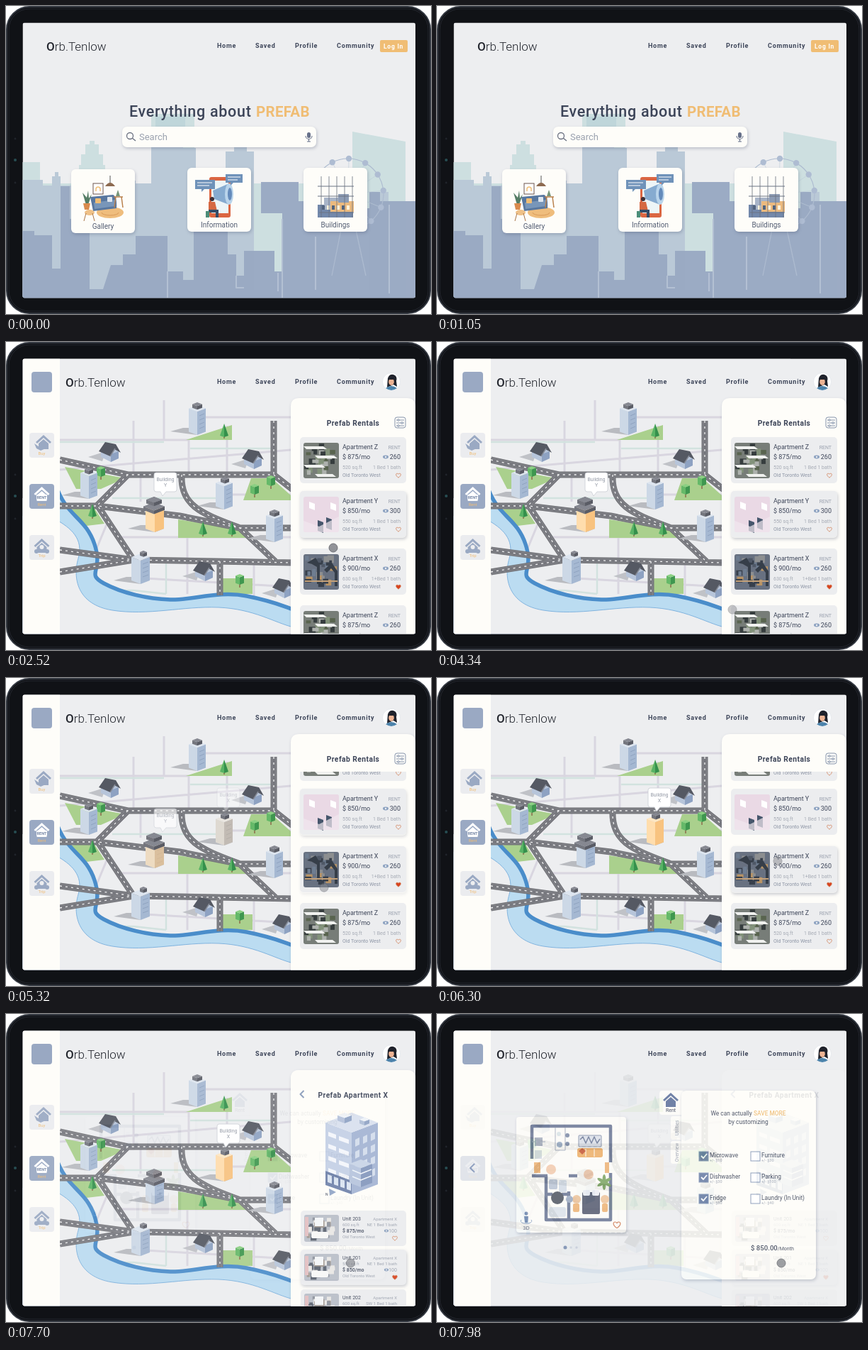
These frames come from a looping animation (600x434 px, 8 s). An HTML page:

```html
<!DOCTYPE html>
<html lang="en">
<head>
<meta charset="utf-8">
<title>Prefab rentals on a tablet</title>
<style>
html, body { margin: 0; height: 100%; overflow: hidden; background: #fff; }
svg { display: block; width: 100vw; height: 100vh; font-family: Roboto, Inter, sans-serif; }
.shadow { filter: drop-shadow(1px 2px 2px #3a456044); }
.nav { font-weight: 600; letter-spacing: .75px; }
.title { font-weight: 600; letter-spacing: .45px; }
</style>
</head>
<body>
<svg id="stage" viewBox="0 0 600 434"></svg>
<script>
const INK = '#3c4458', GREY = '#9aa1ae', BLUE = '#9aa9c3', ORANGE = '#f0bd74', PAPER = '#fefdf9', MIST = '#edeef0', BLACK = '#101216';

// Markup helpers
const rect = (x, y, w, h, fill, r = 0, more = '') =>
  `<rect x="${x}" y="${y}" width="${w}" height="${h}" rx="${r}" fill="${fill}" ${more}/>`;
const circle = (x, y, r, fill, more = '') => `<circle cx="${x}" cy="${y}" r="${r}" fill="${fill}" ${more}/>`;
const ellipse = (x, y, rx, ry, fill) => `<ellipse cx="${x}" cy="${y}" rx="${rx}" ry="${ry}" fill="${fill}"/>`;
const path = (d, fill, more = '') => `<path d="${d}" fill="${fill}" ${more}/>`;
const line = (d, stroke, w = 1, more = '') =>
  `<path d="${d}" fill="none" stroke="${stroke}" stroke-width="${w}" stroke-linejoin="round" ${more}/>`;
const text = (x, y, size, str, fill = INK, more = '') =>
  `<text x="${x}" y="${y}" font-size="${size}" fill="${fill}" ${more}>${str}</text>`;
const MID = 'text-anchor="middle"', END = 'text-anchor="end"';
const group = (id, ...parts) => `<g id="${id}">${parts.join('')}</g>`;
const at = (x, y, ...parts) => `<g transform="translate(${x} ${y})">${parts.join('')}</g>`;
const list = (n, make) => Array.from({ length: n }, (_, i) => make(i)).join('');
const random = seed => () => (seed = seed * 16807 % 2147483647) / 2147483647;

// Shared pieces
const heart = (x, y, full, s = 1) =>
  `<path transform="translate(${x} ${y}) scale(${s})" d="M0 3.2C-6-1-2.5-4.6 0-1.7 2.5-4.6 6-1 0 3.2Z" fill="${full ? '#d8421f' : 'none'}" stroke="#d07a50" stroke-width=".8"/>`;
const eye = (x, y, s = 1) => at(x, y, ellipse(0, 0, 4 * s, 2.4 * s, '#8ea3c1'), circle(0, 0, 1.2 * s, MIST));
const chevron = (x, y, s, color) => line(`M${x + s / 2} ${y - s}L${x - s / 2} ${y}L${x + s / 2} ${y + s}`, color, 2);
const brand = x => text(x, 63, 17, '<tspan font-weight="500">O</tspan>rb.Tenlow', '#23262e', 'font-weight="300"');
const nav = [['Home', 298], ['Saved', 352], ['Profile', 408], ['Community', 467]]
  .map(([label, x]) => text(x, 59, 9, label, INK, 'class="nav"')).join('');
const avatar = circle(544, 56, 12.5, '#fff', 'stroke="#dfe2e8" stroke-width=".7"') +
  path('M538 64L539 51Q541 45 547 46Q553 48 551 55L552 63L547 60Z', '#20232c') +
  ellipse(544, 56, 3.8, 5, '#eeb493') + path('M540 53Q542 48 548 51V53Z', '#20232c') + path('M536 65Q544 59 552 65Q544 71 536 65Z', '#4c83ab');
const screen = rect(23.5, 23.5, 554.5, 388, MIST);

// Home page
const ferris = line('M483 215a50 50 0 1 1-.1 0M483 265L460 380M483 265L508 380', '#aebcd0', 1.2) +
  list(13, i => {
    const a = i * Math.PI * 2 / 13 - 1.55, x = 483 + 50 * Math.cos(a), y = 265 + 50 * Math.sin(a);
    return line(`M483 265L${x} ${y}`, '#bccbd9', .6) + circle(x, y, 4.2, '#aebcd2');
  });
const skyline =
  path('M23 411V220H48V250H103V224H106V209H112V195H118V190H121V178V190H125V195H131V209H137V224H140V250H205V152H227V128V152H266V250H489V177L564 191V411Z', '#cddfe0') +
  path('M211 156H253V170H211Z', '#bfd6da') +
  path('M23 411V245H52V253H65V240H69V234H71V225V234H74V240H77V253H160V246H183V250H205V170H250V200H268V250H310V205H322V198H340V205H350V400H513V262H540V411Z', '#bac9d7') +
  path('M23 412V317H40V323H65V370H77V254H90V300H118V399H137L148 365H165V350H183V324H228V374H250V386H265V261H313V350H325V380H336V345H379V374H390V292H360V248H413V275H435V285H513V262H528V275H578V412Z', BLUE, 'opacity=".96"') +
  ferris +
  line('M228 374V411M325 380V397H336M384 376V402M390 300V411M437 325V400M541 280V405', '#b3c0d3', 2);

const sofaArt = ellipse(147, 291, 19, 8, '#efbd7d') + line('M135 291a12 4 0 0 0 24 0', '#d99a58') +
  rect(123, 250, 14, 15, '#fff', 0, 'stroke="#6c5650"') + line('M127 261v-3a3 3 0 0 1 6 0v3', ORANGE, 1.5) +
  line('M147 239V249', '#555') + path('M140 254Q147 244 154 254Z', '#8d6a50') +
  path('M119 269L151 266Q157 268 156 285L123 289Z', '#58779f') + path('M124 277L154 273V282L125 286Z', '#7896b9') +
  rect(126, 271, 8, 7, ORANGE, 1) + rect(143, 269, 7, 7, '#dee6ef', 1) +
  path('M113 280L108 263L114 270L116 260L117 271L121 265L116 280Z', '#547c65') + path('M109 278h10l-2 9h-6Z', '#d98a4d') +
  line('M152 269H165M155 269L153 284M163 269L165 284', '#b9804c', 1.5) + path('M155 268L158 259L161 268Z', '#77967a') +
  ellipse(118, 291, 7, 4, '#efc188') + line('M113 292L110 303M122 292L125 303', '#a97447');
const newsArt = rect(287, 241, 30, 57, '#db6642', 3) + rect(290, 246, 24, 46, '#edf5f7') +
  path('M292 260L315 250V280L294 272Z', '#86abd0') + ellipse(315, 265, 6, 15, '#b9d4eb') + ellipse(316, 265, 3, 9, '#648bbb') +
  path('M267 245H295V258H280L276 262V258H267Z', '#6f92b9') + line('M270 249H291M270 253H287', '#fff', 1.2) +
  path('M310 237H334V249H321L317 253V249H310Z', '#6f92b9') + line('M313 241H331M313 245H327', '#fff', 1.2) +
  circle(291, 272, 3, '#3d3038') + path('M286 276h9l3 13h-12Z', '#d66942') + path('M286 287H300V298H296V291H286Z', '#354c67') + rect(282, 289, 5, 9, '#4c8d78');
const siteArt = path('M440 280H490V298H440Z', '#7388aa') + rect(449, 270, 20, 17, '#a8b4c8') + rect(458, 275, 33, 15, '#ebba7f') +
  rect(469, 265, 15, 12, '#8d9cb4') + list(6, i => rect(446 + i * 7, 281, 4, 6, i % 2 ? '#fff4dd' : '#52647f')) +
  list(5, i => line(`M${445 + i * 11} 240V298`, '#68707f', .8)) + line('M440 254H491M440 268H491M442 291H491', '#6d7583', 1.2);
const homeCard = (x, y, label, art) =>
  rect(x, y, 90, 90, PAPER, 6, 'class="shadow"') + art + text(x + 45, y + 84, 10, label, '#535d73', MID);

const home = group('home', screen, skyline, brand(57), nav,
  rect(528, 48, 39, 17, ORANGE, 2), text(533, 59.5, 8.5, 'Log In', '#fff', 'class="nav"'),
  text(174, 156, 21.5, 'Everything about', INK, 'font-weight="500" letter-spacing=".7"'),
  text(353, 156, 20.5, 'PREFAB', ORANGE, 'font-weight="700" letter-spacing=".3"'),
  rect(164, 170, 274, 29, PAPER, 7, 'class="shadow"'),
  circle(175, 183, 4.5, 'none', 'stroke="#6a7080" stroke-width="1.3"'), line('M178 186L183 190', '#6a7080', 1.5),
  text(188, 189, 13, 'Search', GREY),
  rect(425, 178, 5, 8, '#67718a', 2.5), line('M423 183a4.5 4.5 0 0 0 9 0M427.5 188V191M425 191H430', '#67718a', 1.1),
  homeCard(92, 230, 'Gallery', sofaArt), homeCard(256, 228, 'Information', newsArt), homeCard(420, 228, 'Buildings', siteArt),
  group('drawer', rect(0, 23, 79, 389, BLACK)));

// City map
const box = (x, top, bottom, w, left, right, roof) => {
  const s = w * .38;
  return path(`M${x - w} ${top + s}L${x} ${top + 2 * s}V${bottom}L${x - w} ${bottom - s}Z`, left) +
    path(`M${x + w} ${top + s}L${x} ${top + 2 * s}V${bottom}L${x + w} ${bottom - s}Z`, right) +
    path(`M${x - w} ${top + s}L${x} ${top}L${x + w} ${top + s}L${x} ${top + 2 * s}Z`, roof);
};
const cap = (x, y, w) => box(x, y, y + w * .76 + 5, w, '#74767e', '#5a5c65', '#868891');
const tower = (x, top, bottom, w = 12, lit = false) =>
  (lit ? '' : path(`M${x} ${bottom}L${x - 38} ${bottom - 5}L${x - 20} ${bottom - 10}H${x}Z`, '#b9bbc0')) +
  (lit ? box(x, top, bottom, w, '#ffddad', '#f8c380', '#ffe6c2') : box(x, top, bottom, w, '#ccd8e6', '#a5b8d2', '#dde5ef')) +
  (lit ? '' : list(4, i => line(`M${x + 3} ${top + 15 + i * 6}L${x + w - 2} ${top + 12 + i * 6}`, '#8fa3c0', 1)));
const towerX = lit => tower(308, 194, 236, 12, lit) + cap(309, 190, 6);
const towerY = lit => tower(210, 228, 268, 13, lit) + cap(209, 226, 15) + cap(209, 218, 11);
const house = (x, y) =>
  path(`M${x - 10} ${y + 14}L${x - 30} ${y + 8}L${x - 5} ${y}Z`, '#c0c2c7') +
  path(`M${x - 12} ${y - 2}L${x + 3} ${y - 9}L${x + 13} ${y + 1}V${y + 10}L${x + 2} ${y + 15}L${x - 12} ${y + 8}Z`, '#b7c5da') +
  path(`M${x + 2} ${y + 4}L${x + 13} ${y}V${y + 10}L${x + 2} ${y + 15}Z`, '#8ea2c2') +
  path(`M${x - 15} ${y}L${x - 6} ${y - 13}L${x + 9} ${y - 10}L${x + 16} ${y + 2}L${x + 7} ${y - 3}L${x + 1} ${y + 7}Z`, '#555963') +
  line(`M${x + 1} ${y + 7}L${x + 8} ${y - 4}`, '#858a95', 1.5);
const pine = (x, y) => line(`M${x} ${y}V${y + 4}`, '#8b6b4b', 1.5) +
  path(`M${x} ${y - 17}L${x - 6} ${y}L${x} ${y + 2}Z`, '#58b365') + path(`M${x} ${y - 17}L${x + 6} ${y}L${x} ${y + 2}Z`, '#34904c');
const bush = (x, y) => line(`M${x} ${y}V${y + 8}`, '#8b6b4b', 1.5) + box(x, y - 11, y + 4, 6, '#65b969', '#3f974f', '#8bd083');

const lanes = 'M76 166L172 187H378L406 209M378 111V187M172 187L129 230L180 307M76 231L129 231L245 245L330 262H406M248 187C246 232 278 242 330 262L380 309M76 293L180 307L406 311M76 324L180 307M302 309V357';
const bank = 'M70 200C84 246 112 246 125 285S112 326 138 340S200 362 232 363S300 350 340 358S390 372 406 377';
const city =
  line('M76 138H258M180 111V187M223 82V137M258 137V187M312 118V187M258 106H402M190 187V225M76 180L402 152M160 275H402M256 250V355M350 310V360M180 332L402 345M320 215H402M145 250L120 310', '#d9d6e0', 3) +
  line('M76 141H223M260 150H375M150 220H300M226 310V355M120 350H180L226 355', '#d2e2df', 2.5) +
  ['M83 176L168 192L134 207H99Z', 'M254 138L319 117V138Z', 'M335 223L346 192H375L402 216V223Z', 'M243 250L329 264L348 276H243Z', 'M303 333H348V355H303Z', 'M76 237L124 233L139 256L97 261Z']
    .map(d => path(d, '#aad08d')).join('') +
  path(bank + 'V402C380 396 350 376 300 374S200 386 150 378S94 332 102 305S92 262 70 250Z', '#bbdcf1', 'stroke="#6ea8da" stroke-width=".8"') +
  line(bank, '#4a8dca', 5.5) +
  line(lanes, '#737479', 9) + line(lanes, '#929398', 6) + line(lanes, '#77787e', 5) +
  line(lanes, '#f3f3f4', 1.3, 'stroke-dasharray="3 5"') +
  house(146, 154) + house(348, 164) + tower(270, 89, 131) + cap(270, 85, 7) + pine(308, 132) +
  bush(134, 186) + tower(117, 180, 221) + cap(117, 177, 6) + bush(351, 211) + bush(374, 199) + towerX() +
  pine(122, 245) + towerY() + pine(278, 270) + pine(319, 270) + tower(379, 240, 282) + cap(379, 236, 7) +
  tower(190, 298, 341, 13) + cap(194, 294, 5) + house(279, 322) + bush(330, 338) + house(391, 346);
const bubble = (x, y, name) =>
  path(`M${x + 3} ${y}H${x + 29}q3 0 3 3V${y + 24}q0 3-3 3H${x + 17}L${x + 12} ${y + 33}L${x + 9} ${y + 27}H${x + 3}q-3 0-3-3V${y + 3}q0-3 3-3Z`, '#fff', 'stroke="#c9cdd4" stroke-width=".8"') +
  text(x + 16, y + 12, 7, 'Building', '#9399a5', MID) + text(x + 16, y + 20, 7, name, '#9399a5', MID);

// Sidebar
const homeIcon = (x, y, fill) => path(`M${x - 11} ${y}L${x} ${y - 10}L${x + 11} ${y}L${x + 9} ${y + 2}L${x} ${y - 6}L${x - 9} ${y + 2}Z`, fill) +
  path(`M${x - 7} ${y + 2}L${x} ${y - 4}L${x + 7} ${y + 2}V${y + 10}H${x - 7}Z`, fill);
const sideButton = (y, label, active, icon) => rect(33, y, 35, 35, active ? BLUE : '#ebecef', 4) + icon +
  text(50.5, y + 31, 6, label, ORANGE, MID);
const sidebar = rect(23.5, 23.5, 52.5, 388, PAPER) + rect(36, 42, 29, 29, BLUE, 4);
const buyIcon = homeIcon(53, 141, BLUE) + path('M40 143L47 148L53 146L56 150L49 153L43 150Z', BLUE);
const rentIcon = homeIcon(50.5, 214, '#fff') + rect(43, 215, 15, 7, '#fff') + text(50.5, 221, 5.5, 'RENT', '#7586a5', MID + ' font-weight="700"');
const tripIcon = homeIcon(50.5, 287, BLUE) + circle(50.5, 289, 3, MIST) + circle(43, 295, 3, BLUE) + circle(58, 295, 3, BLUE);

// Flat stand-ins for photographs
const photo = (x, y, w, h, kind) => {
  const next = random(kind.charCodeAt(0) * 97), pick = a => a[Math.floor(next() * a.length)];
  const tones = { X: ['#4f5867', '#8d8f91', '#373f4b', '#b99465', '#6e7d91'], Z: ['#59644f', '#82927a', '#363d3e', '#aeb2ae'], U: ['#8c929d', '#9f968f', '#5b626f', '#e8e6e4'] }[kind];
  let art = rect(0, 0, w, h, { X: '#687181', Y: '#ead9e5', Z: '#777d78', U: '#b9bec8' }[kind], 3);
  if (kind === 'Y') art += [[8, 7], [32, 29], [38, 8], [20, 33]].map(([a, b], i) =>
    path(`M${a} ${b}l8 3v${i % 2 ? 15 : 9}l-8-3Z`, i % 2 ? '#46566c' : '#fff')).join('') + path('M0 34L22 42L50 28V47Q50 50 47 50H3Q0 50 0 47Z', '#f2e8ef', 'opacity=".7"');
  else {
    art += list(26, i => rect(1 + next() * (w - 12), 1 + next() * (h - 12), 4 + next() * 6, 4 + next() * 7, pick(tones)));
    if (kind === 'Z') art += list(4, i => path(`M${i % 2 * 16} ${5 + i * 13}h${28 - i}l5 4h-${29 - i}Z`, '#f0f1ef'));
    if (kind === 'X') art += path('M5 12L17 5L23 15V42H19V18L12 14ZM29 22L40 12L48 24V45H44V26L39 20L33 26Z', '#363e49') + line('M2 38H48', '#c3a078', 2);
    if (kind === 'U') art += rect(10, 24, 24, 9, '#f8f8f7', 2) + rect(15, 4, 12, 12, '#f3f6f8') + rect(1, 3, 5, 27, '#e2bec0');
  }
  return at(x, y, art);
};

// Rental list
const rental = (y, name, price, views, size, beds, liked) => {
  const hover = name === 'Z' ? '' : `<g id="hover${name}">${rect(415, y, 150, 66, '#f0f0ee', 5, 'class="shadow"')}</g>`;
  return hover + rect(415, y, 150, 65, '#ecedef', 5) + photo(420, y + 8, 50, 50, name) +
    text(475, y + 17, 9, 'Apartment ' + name) + text(557, y + 17, 7, 'RENT', GREY, END) +
    text(475, y + 31, 9, `$ ${price}/mo`) + eye(536, y + 28) + text(557, y + 31, 9, views, INK, END) +
    text(475, y + 45, 7, size + ' sq.ft', '#a6abb5') + text(557, y + 45, 7, beds + ' bath', '#a6abb5', END) +
    text(475, y + 56, 7, 'Old Toronto West', '#8d95a5') + heart(554, y + 54, liked);
};
const rentals = group('rentals',
  text(490, 118, 10.3, 'Prefab Rentals', INK, MID + ' class="title"'),
  rect(549, 106, 15, 15, 'none', 3, 'stroke="#8795ac"'),
  list(3, i => line(`M551 ${110 + i * 4}H562`, '#8795ac') + circle(i % 2 ? 559 : 554, 110 + i * 4, 1.3, '#fff', 'stroke="#8795ac"')),
  '<g clip-path="url(#listClip)">',
  group('scroller', rental(134, 'Z', 875, 260, 520, '1 Bed 1', false), rental(210, 'Y', 850, 300, 550, '1 Bed 1', false),
    rental(291, 'X', 900, 260, 630, '1+Bed 1', true), rental(371, 'Z', 875, 260, 520, '1 Bed 1', false)),
  '</g>');

// Apartment details
const facade = box(488, 139, 254, 37, '#c4d0e5', '#a3b3d3', '#d8e0ee') +
  box(478, 139, 154, 10, '#b3c1d9', '#8fa2c4', '#eef2f8') + box(506, 146, 157, 7, '#aebdd6', '#8fa2c4', '#eef2f8') +
  list(4, f => path(`M455 ${166 + f * 17}l11 4v6l-11-4ZM470 ${172 + f * 17}l14 5v6l-14-5Z`, '#f3f6fb') +
    list(3, i => path(`M${493 + i * 11} ${177 + f * 17 - i * 4}l6-3v10l-6 3Z`, '#d3ddec'))) +
  path('M451 221L488 235V254L451 241Z', '#6f82aa') + list(4, i => path(`M${454 + i * 9} ${226 + i * 3.3}l6 2v11l-6-2Z`, '#dbe4f1')) +
  box(501, 205, 244, 16, '#b6c4dd', '#8497bc', '#c8d4e6') + line('M489 220L501 225L516 219M489 229L501 234L516 228', '#eef3f9', 1.5) +
  path('M456 246l10 5l-9 5Z', '#91a4c6') + text(451, 256, 5, 'N');
const unit = (y, number, price, liked, hover) => rect(416, y, 149, 50, '#ecedef', 5, hover ? 'class="shadow"' : '') +
  photo(421, y + 6, 49, 38, 'U') + text(475, y + 14, 7, 'Unit ' + number) + text(552, y + 14, 6, 'Apartment X', GREY, END) +
  text(475, y + 22, 6, (number === 201 ? 550 : 600) + ' sq.ft', GREY) + text(552, y + 22, 6, (number === 202 ? 'SW' : 'NE') + ' 1 Bed 1 bath', GREY, END) +
  text(475, y + 31, 7, `$ ${price}/mo`, INK, 'font-weight="500"') + eye(537, y + 28.5, .8) + text(552, y + 31, 7, '100', GREY, END) +
  text(475, y + 39, 6, 'Old Toronto West', GREY) + heart(549, y + 39, liked);
const panelShape = 'M402 412V91Q402 79 414 79H566Q578 79 578 91V412Z';
const details = group('details', path(panelShape, PAPER), chevron(418, 113, 5, '#8799b9'),
  text(490, 118, 10.2, 'Prefab Apartment X', INK, MID + ' class="title"'), facade,
  unit(277, 203, 875, false), unit(332, 201, 850, true, true), unit(388, 202, 875, false));

const map = group('map', screen, city,
  group('markY', towerY(true), bubble(209, 184, 'Y')), group('markX', towerX(true), bubble(298, 155, 'X')),
  sidebar, sideButton(128, 'Buy', false, buyIcon), sideButton(200, 'Rent', true, rentIcon), sideButton(272, 'Trip', false, tripIcon),
  brand(84), nav, avatar, path(panelShape, PAPER, 'class="shadow"'), rentals, details);

// Floor plan page
const floorPlan = rect(112, 145, 155, 163, PAPER, 4, 'class="shadow"') +
  line('M134 204V158H245V209M134 228H156M154 228V290H245V224M186 250V290M186 228H198M154 254H163M176 254H186', '#707b98', 4.5) +
  line('M134 180H153M167 160V192H181V160', '#a8b0bf') + rect(138, 174, 11, 12, '#aeb5c3') + rect(138, 192, 10, 12, '#d5dae3') +
  circle(172, 169, 3, '#dce6e8') + circle(173, 184, 4, '#9cafc5') + circle(184, 171, 3, '#8290aa') + circle(184, 183, 3, '#8290aa') +
  rect(200, 171, 32, 16, '#dde2ea', 1, 'stroke="#8793aa"') + line('M202 177l4-4l4 9l4-9l4 9l4-9l4 9l4-6', '#707d99', 1.5) +
  rect(198, 189, 36, 13, '#efb26b', 3) + line('M210 190V201M222 190V201', '#fff') + path('M205 189l5 4l-5 5l-5-5Z', '#c85b38') +
  circle(161, 219, 7, '#f4cdb1') + circle(214, 226, 7, '#f4cdb1') + rect(137, 209, 9, 15, '#efb779') + rect(237, 209, 6, 15, '#efb779') +
  list(6, i => `<ellipse cx="236" cy="233" rx="2.4" ry="7" fill="#80a867" transform="rotate(${i * 60} 236 237)"/>`) +
  rect(205, 251, 25, 31, '#5a6073', 2) + rect(206, 248, 10, 8, '#eef0f4', 2) + rect(219, 248, 10, 8, '#eef0f4', 2) +
  circle(197, 261, 6, '#f1c89f') + circle(237, 261, 6, '#f1c89f') + rect(192, 267, 9, 12, '#efb779', 2) + rect(233, 267, 8, 12, '#efb779', 2) +
  rect(158, 233, 12, 14, '#bdc8d7', 2) + rect(172, 234, 11, 17, '#d7dfe8', 2) + rect(158, 272, 24, 14, '#dfe5ec', 3) + circle(170, 259, 9, '#555b66') + circle(187, 261, 5, '#a4b2c8') +
  circle(126, 281, 2.5, '#7f91b2') + path('M123 285h6l-1 9h-4Z', '#7f91b2') + line('M119 290C114 297 138 297 133 290', '#8ba2c3') +
  text(126, 304, 8, '3D', '#68738a', MID) + heart(254, 297, false, 1.45) +
  circle(181, 329, 2.5, '#7f91b2') + circle(189, 329, 1.7, '#d2d7df') + circle(197, 329, 1.7, '#d2d7df');
const option = (x, y, label, price, checked) =>
  rect(x, y, 13, 13, checked ? '#6b7fa6' : '#fff', 0, 'stroke="#8395b5"') +
  (checked ? line(`M${x + 3} ${y + 6}l3 3l5-6`, '#fff', 1.8) : '') +
  text(x + 15, y + 8, 8.3, label) + text(x + 15, y + 14, 5.5, '+/- $' + price, GREY);
const sideTab = (y, h, label) => rect(330, y, 16, h, PAPER, 3) +
  `<text transform="translate(341 ${y + h / 2}) rotate(-90)" font-size="6.5" fill="${GREY}" ${MID}>${label}</text>`;
const plan = group('plan', screen, sidebar, rect(33, 200, 35, 35, '#ebecef', 4), chevron(50, 217, 6, '#8497ba'), brand(84), nav, avatar, floorPlan,
  sideTab(144, 33, 'Utilities'), sideTab(179, 32, 'Overview'), rect(314, 108, 35, 34, PAPER, 4),
  rect(345, 108, 190, 266, PAPER, 7, 'class="shadow"'), homeIcon(330, 121, '#60749d'), text(330, 138, 7, 'Rent', INK, MID),
  text(439.5, 143, 8.4, `We can actually <tspan fill="${ORANGE}" font-weight="500">SAVE MORE</tspan>`, INK, MID), text(439.5, 155, 8.4, 'by customizing', INK, MID),
  option(370, 194, 'Microwave', 10, true), option(370, 224, 'Dishwasher', 30, true), option(370, 254, 'Fridge', 80, true),
  option(443, 194, 'Furniture', 30), option(443, 224, 'Parking', 100), option(443, 254, 'Laundry (In Unit)', 40),
  text(443, 333, 9.6, '$ 850.00<tspan font-size="7" font-weight="400">/Month</tspan>', INK, 'font-weight="500"'));

const stage = document.getElementById('stage');
stage.innerHTML = `<defs><clipPath id="screenClip">${rect(23.5, 23.5, 554.5, 388, '#000', 3)}</clipPath>
  <clipPath id="listClip">${rect(405, 132, 173, 279, '#000')}</clipPath></defs>` +
  rect(48, 0, 24, 3, '#4b5365', 1) + rect(77, 0, 24, 3, '#4b5365', 1) + rect(0, 46, 3, 16, '#4b5365', 1) +
  rect(1, 1, 598, 432, BLACK, 32, 'stroke="#343942" stroke-width="2"') +
  rect(4, 4, 592, 426, 'none', 29, 'stroke="#23262e"') +
  circle(13, 217, 2, '#284e53') + circle(13, 187, 1.4, '#20242b') + circle(13, 249, 1.4, '#20242b') +
  `<g clip-path="url(#screenClip)">${home}${map}${plan}
  ${group('cursor', circle(0, 0, 6, '#85878d', 'stroke="#5f6167"'))}</g>`;

// Motion
const LOOP = 8000, STEP = 70;
const part = id => document.getElementById(id);
const ramp = (t, from, to) => Math.min(1, Math.max(0, (t - from) / (to - from)));
const ease = (t, from, to) => {
  const k = ramp(t, from, to);
  return k * k * (3 - 2 * k);
};
const fade = (id, value) => { part(id).style.opacity = value; };
const move = (id, x, y) => part(id).setAttribute('transform', `translate(${x} ${y})`);

// time, x, y, opacity
const cursorStops = [[2100, 440, 270, 0], [2450, 462, 290, .9], [3200, 462, 290, .8], [4340, 417, 377, .45],
  [5110, 425, 323, .5], [5600, 481, 258, .5], [6500, 481, 258, .5], [7350, 487, 351, .5], [8000, 486, 351, .8]];
const cursorAt = t => {
  const i = cursorStops.findIndex(stop => stop[0] > t);
  if (i < 1) return cursorStops[0].slice(1);
  const a = cursorStops[i - 1], b = cursorStops[i], k = ramp(t, a[0], b[0]);
  return [1, 2, 3].map(n => a[n] + (b[n] - a[n]) * k);
};

function render(t) {
  move('drawer', 578 - 79 * ease(t, 1640, 1820), 0);
  fade('map', ease(t, 1680, 1960));

  const toX = ease(t, 5180, 5530);
  for (const id of ['markY', 'hoverY']) fade(id, 1 - toX);
  for (const id of ['markX', 'hoverX']) fade(id, toX);
  move('scroller', 0, -54 * ease(t, 4410, 5110));
  fade('details', ease(t, 6440, 6720));
  fade('plan', ease(t, 7620, 8080));

  const [x, y, opacity] = cursorAt(t);
  move('cursor', x, y);
  fade('cursor', opacity);
}

const start = performance.now();
function tick() {
  const t = (performance.now() - start) % LOOP;
  render(Math.floor(t / STEP) * STEP);
  requestAnimationFrame(tick);
}
tick();
</script>
</body>
</html>
```
